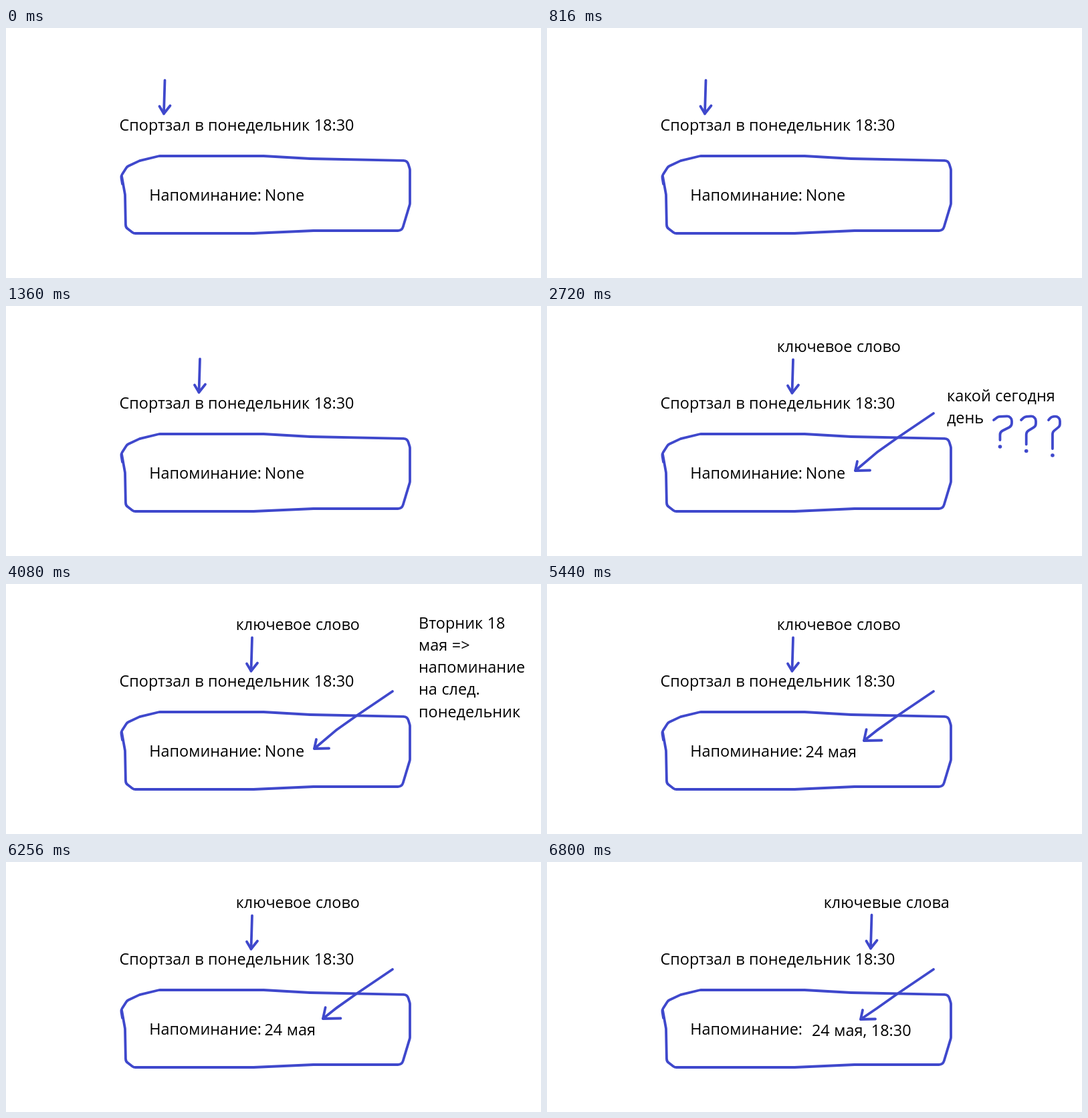
Animation, 800 px wide and 375 px high, one loop 8160 ms. Source, as an HTML page with a canvas:

```html
<!DOCTYPE html>
<html lang="ru">
<head>
<meta charset="utf-8">
<title>Напоминание</title>
<style>
html, body { margin: 0; width: 100%; height: 100%; overflow: hidden; background: #fff; }
canvas { display: block; width: 800px; height: 375px; }
</style>
</head>
<body>
<canvas id="stage" width="800" height="375"></canvas>
<script>
const ctx = document.getElementById('stage').getContext('2d');
const STEP = 1360, LINE = 33.3;
const INK = '#3f48cc';

// Pen line through [x, y] points with rounded bends.
function pen(points, radius = 0) {
  ctx.beginPath();
  ctx.moveTo(...points[0]);
  points.slice(1).forEach((p, i) => ctx.arcTo(...p, ...(points[i + 2] || p), radius));
  ctx.lineTo(...points.at(-1));
  ctx.stroke();
}

function text(x, y, ...lines) {
  ctx.fillStyle = '#000';
  lines.forEach((line, i) => ctx.fillText(line, x, y + i * LINE));
}

function box() {
  pen([[174, 234], [172, 222], [181, 208], [200, 199], [229, 192], [385, 192], [455, 196],
    [600, 199], [604, 212], [604, 264], [592, 304], [460, 304], [370, 308], [191, 308],
    [179, 299], [178, 250], [173, 222]], 8);
}

// Short arrow pointing down at a word.
function pointer(x, y) {
  pen([[x, y], [x - 1.5, y + 50]]);
  pen([[x - 8, y + 39], [x - 1.5, y + 50], [x + 8, y + 38]]);
}

// Long arrow from the right-hand note to the reminder.
function noteArrow(x, y, size = 1) {
  pen([[578, 161], [525, 197], [494, 219], [x, y]], 40);
  pen([[x + 3 * size, y - 14 * size], [x, y], [x + 22 * size, y - 0.5]]);
}

function question(x, y, w, h) {
  const stem = x + w * 0.35;
  pen([[x, y + 5], [x + w * 0.25, y], [x + w, y - 1], [x + w, y + 14], [stem, y + 23], [stem, y + h - 10]], 7);
  ctx.fillStyle = INK;
  ctx.beginPath();
  ctx.arc(stem, y + h, 2.8, 0, 7);
  ctx.fill();
}

function keyword() {
  text(343.7, 68.5, 'ключевое слово');
  pointer(368, 80.5);
}

function reminder(value, x = 386.8, y = 259) {
  text(x, y, value);
}

const scenes = [
  () => {
    pointer(237.5, 78.5);
    reminder('None');
  },
  () => {
    pointer(290, 79.5);
    reminder('None');
  },
  () => {
    keyword();
    noteArrow(461, 247);
    text(598, 143, 'какой сегодня', 'день');
    for (let i = 0; i < 3; i++) question(668 + 41 * i, 166, 27 - 5 * i, 45 + 6.5 * i);
    reminder('None');
  },
  () => {
    keyword();
    noteArrow(461, 247);
    text(617, 66.5, 'Вторник 18', 'мая =>', 'напоминание', 'на след.', 'понедельник');
    reminder('None');
  },
  () => {
    keyword();
    noteArrow(474, 235, 1.2);
    reminder('24 мая', 386.5, 260);
  },
  () => {
    text(413.7, 68.5, 'ключевые слова');
    pointer(485.5, 79.5);
    noteArrow(469, 236);
    reminder('24 мая, 18:30', 396, 261);
  }
];

function draw(time) {
  ctx.fillStyle = '#fff';
  ctx.fillRect(0, 0, 800, 375);
  ctx.font = '23.4px "Open Sans", "Noto Sans", sans-serif';
  ctx.wordSpacing = '0.5px';
  ctx.strokeStyle = INK;
  ctx.lineWidth = 3.8;
  ctx.lineCap = ctx.lineJoin = 'round';
  box();
  text(169.5, 154, 'Спортзал в понедельник 18:30');
  text(214.3, 259, 'Напоминание:');
  scenes[Math.floor(time / STEP) % scenes.length]();
}

const start = performance.now();
function tick() {
  draw(performance.now() - start);
  requestAnimationFrame(tick);
}
tick();
</script>
</body>
</html>
```
